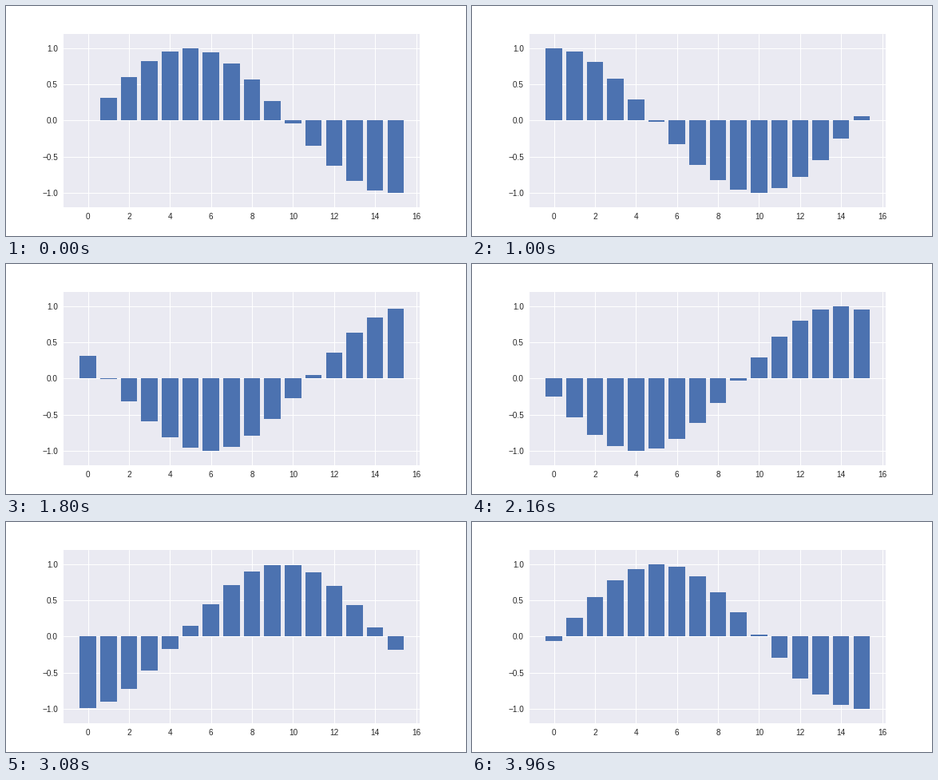
A matplotlib script that plays this animation: 576 by 288 pixels, repeating every 4000 ms.

```python
import numpy as np
import matplotlib.pyplot as plt
from matplotlib.animation import FuncAnimation

FRAMES = 100
INTERVAL = 40
TEXT = "0.15"

plt.rcParams.update({
    "font.family": "Liberation Sans",
    "font.size": 10,
    "axes.facecolor": "#EAEAF2",
    "axes.edgecolor": "white",
    "axes.linewidth": 0,
    "axes.axisbelow": True,
    "axes.grid": True,
    "grid.color": "white",
    "grid.linestyle": "-",
    "grid.linewidth": 1,
    "lines.solid_capstyle": "round",
    "xtick.color": TEXT,
    "ytick.color": TEXT,
    "xtick.major.size": 0,
    "ytick.major.size": 0,
    "xtick.major.pad": 7,
    "ytick.major.pad": 7,
})

fig, ax = plt.subplots(figsize=(8, 4), dpi=72, facecolor="white")
fig.subplots_adjust(left=0.125, right=0.9, bottom=0.125, top=0.88)

x = np.arange(16)


def wave(frame):
    return np.sin(x / np.pi + 2 * np.pi * frame / FRAMES)


bars = ax.bar(x, wave(0), width=0.8, color="#4C72B0", linewidth=0)
ax.set_xlim(-1.19, 16.19)
ax.set_ylim(-1.2, 1.2)
ax.set_xticks(np.arange(0, 17, 2))
ax.set_yticks(np.arange(-1, 1.1, 0.5))


def update(frame):
    for bar, height in zip(bars, wave(frame)):
        bar.set_height(height)
    return list(bars)


anim = FuncAnimation(fig, update, frames=FRAMES, interval=INTERVAL,
                     init_func=lambda: update(0), repeat=True, repeat_delay=0)

plt.show()
```
